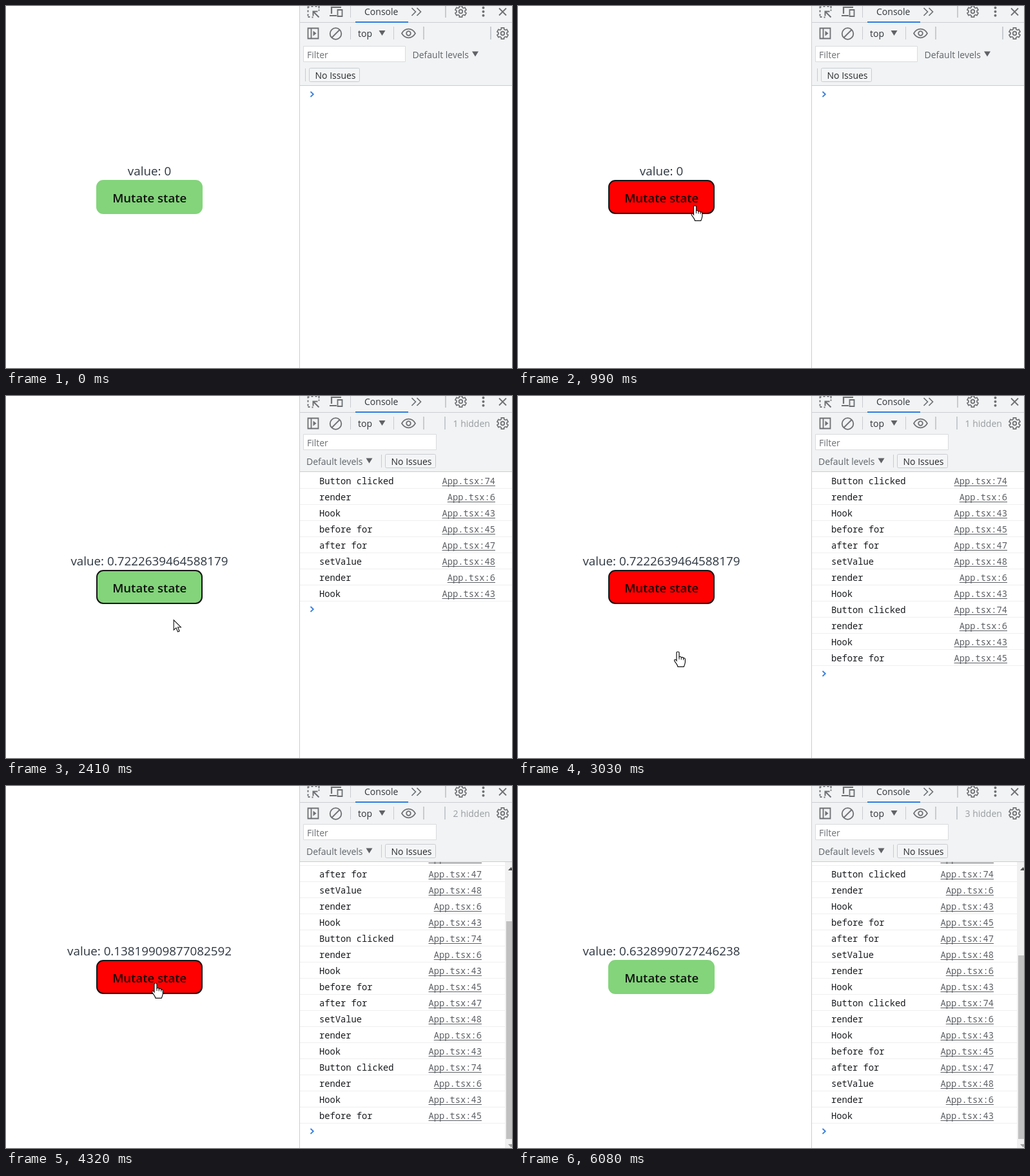
An HTML page with a canvas that plays this animation: 785 px wide and 562 px high, repeating every 6220 ms.

```html
<!DOCTYPE html>
<html lang="en">
<head>
<meta charset="utf-8">
<title>Mutate state</title>
<style>
html, body { margin: 0; width: 100%; height: 100%; overflow: hidden; background: #fff; }
canvas { display: block; width: 785px; height: 562px; }
</style>
</head>
<body>
<canvas id="stage" width="785" height="562"></canvas>
<script>
const ctx = document.getElementById('stage').getContext('2d');
const LOOP = 6220;
const SANS = '"Open Sans", "Noto Sans", sans-serif';
const UI = '14px ' + SANS;
const MONO = '13.75px "Noto Sans Mono", "DejaVu Sans Mono", monospace';
const ICON = '#6e7073';

const LOGS = [
  ['Button clicked', 74], ['render', 6], ['Hook', 43], ['before for', 45],
  ['after for', 47], ['setValue', 48], ['render', 6], ['Hook', 43]
];

// [start time, value] pairs; the last one reached is in force
const VALUES = [[0, '0'], [1880, '0.7222639464588179'], [3470, '0.13819909877082592'], [5000, '0.6328990727246238']];
const ROWS = [[0, 0], [1160, 4], [1910, 8], [2750, 12], [3500, 16], [4320, 20], [5030, 24]];
const HIDDEN = [[0, 0], [1910, 1], [3500, 2], [5030, 3]];
const BUSY = [[990, 1880], [2580, 3470], [4150, 5000]];
const FROZEN_HAND = [[990, 2300], [2580, 3790], [4150, 5390]];

const linear = p => p;
const easeOut = p => 1 - (1 - p) * (1 - p);
const smooth = p => p * p * (3 - 2 * p);

// pointer moves: start, end, from, control point, to, easing
const MOVES = [
  [100, 710, [648, 556], [340, 425], [281.5, 319], easeOut],
  [730, 960, [281.5, 319], [278, 314], [274.5, 310], linear],
  [1160, 1390, [274.5, 310], [262, 355], [282.5, 405], smooth],
  [2300, 2580, [282.5, 405], [273, 365], [237, 308], easeOut],
  [2820, 3030, [237, 308], [242.5, 352], [248, 397], linear],
  [3790, 4150, [248, 397], [242, 350], [232, 306], easeOut],
  [4390, 4660, [232, 306], [229, 360], [228, 416], smooth],
  [5390, 5480, [228, 416], [320, 455], [412, 510], linear]
];

const at = (list, t) => list.filter(e => e[0] <= t).pop()[1];
const within = (spans, t) => spans.some(([a, b]) => t >= a && t < b);

function pointer(t) {
  if (t < 100 || t >= 5480) return null;
  const [a, b, p0, p1, p2, ease] = MOVES.filter(m => m[0] <= t).pop();
  const k = ease(Math.min(1, (t - a) / (b - a)));
  return p0.map((v, i) => (1 - k) * (1 - k) * v + 2 * k * (1 - k) * p1[i] + k * k * p2[i]);
}

function text(s, x, y, font, color, align = 'left') {
  ctx.font = font;
  ctx.fillStyle = color;
  ctx.textAlign = align;
  ctx.fillText(s, x, y);
}

function rect(x, y, w, h, color) {
  ctx.fillStyle = color;
  ctx.fillRect(x, y, w, h);
}

function path(d, x, y, stroke, width, fill) {
  const p = new Path2D(d);
  ctx.save();
  ctx.translate(x, y);
  if (fill) { ctx.fillStyle = fill; ctx.fill(p); }
  if (stroke) { ctx.strokeStyle = stroke; ctx.lineWidth = width; ctx.stroke(p); }
  ctx.restore();
}

function circle(x, y, r, width, color = ICON) {
  ctx.beginPath();
  ctx.arc(x, y, r, 0, 7);
  if (width) { ctx.strokeStyle = color; ctx.lineWidth = width; ctx.stroke(); }
  else { ctx.fillStyle = color; ctx.fill(); }
}

function box(x, y, w, h, r, fill, border, width) {
  const i = width / 2;
  ctx.beginPath();
  ctx.roundRect(x + i, y + i, w - width, h - width, r);
  ctx.fillStyle = fill;
  ctx.fill();
  ctx.strokeStyle = border;
  ctx.lineWidth = width;
  ctx.stroke();
}

function gear(x, y) {
  ctx.beginPath();
  for (let i = 0; i < 6; i++) {
    for (const [r, off] of [[6.6, -0.36], [8.9, -0.24], [8.9, 0.24], [6.6, 0.36]]) {
      const a = i * Math.PI / 3 + Math.PI / 2 + off;
      ctx.lineTo(x + r * Math.cos(a), y + r * Math.sin(a));
    }
  }
  ctx.closePath();
  ctx.strokeStyle = ICON;
  ctx.lineWidth = 1.7;
  ctx.stroke();
  circle(x, y, 2.8, 1.8);
}

const sep = (x, y, h, w = 1) => rect(x, y, w, h, '#c8cbcf');
const triangle = (x, y) => path('M-5 -4H5L0 4Z', x, y, null, 0, '#606266');
const HAND = 'M-2 2Q-2 0 0 0Q2 0 2 2V8Q4.5 6.6 5.3 9Q8 7.8 8.6 10Q11.4 9.4 11.4 12V16.5Q10.8 20 9.2 23.4H0Q-.6 20.5-4.6 15.4Q-6.4 12.6-4.4 12Q-3.4 11.8-2 13.8Z';
const ARROW = 'M.5 .5V16L4.2 12.6L6.8 18.8L9.4 17.7L6.8 11.7H11.6Z';

function page(t) {
  text('value: ' + at(VALUES, t), 222.5, 263, '18.8px ' + SANS, '#2d3640', 'center');
  const busy = within(BUSY, t);
  const fill = busy ? '#ff0000' : '#83d47b';
  const focus = t >= 990 && t < 6080;
  box(140, 270, 165, 53, 10, fill, focus ? '#141414' : fill, 2);
  text('Mutate state', 222.7, 305, '600 18.6px ' + SANS, busy ? '#1c0505' : '#111', 'center');
  // smear the pointer leaves on the blocked button
  if (t >= 1180 && t < 1880) {
    ctx.save();
    ctx.beginPath();
    ctx.rect(271, 310, 14, 12);
    ctx.clip();
    path(HAND, 274.5, 310, null, 0, '#8c0000');
    ctx.restore();
    rect(272, 318, 4, 4, '#140000');
  }
}

function tabs() {
  rect(456, 25, 329, 1, '#cbcdd1');
  path('M2 1H0V3M0 6V9M0 12V15M0 16.5H3M6 17H8M5 0H8M11 0H14M16 0H17V3M17 5V7', 468.5, .5, ICON, 2);
  path('M8 8L17 17M8 15V8H15', 468.5, .5, ICON, 2);
  path('M3 12V2H18M0 15H11', 502, 0, ICON, 2.2);
  path('M13 6H20V16H13Z', 501.5, 0, ICON, 1.8);
  sep(534, 0, 18);
  text('Console', 556, 14, UI, '#33363a');
  rect(542, 24, 82, 2, '#2f7de1');
  path('M0 0L6 6L0 12M8 0L14 6L8 12', 629.5, 3, ICON, 1.7);
  sep(681, 0, 18, 2);
  gear(705.5, 8.5);
  for (const y of [3, 9, 15]) circle(740.5, y - .3, 2);
  path('M0 0L11 11M11 0L0 11', 765, 3.5, ICON, 1.8);
}

function toolbar(hidden) {
  path('M0 0H16V16H0ZM5 0V16', 468.5, 34.5, ICON, 1.8);
  path('M0 0L5 4L0 8Z', 476.5, 38.5, null, 0, ICON);
  circle(511.5, 43, 8.8, 1.8);
  path('M-6 6L6 -6', 511.5, 43, ICON, 1.8);
  sep(534, 32, 20);
  text('top', 546, 48, UI, '#303338');
  triangle(583.5, 42);
  sep(601, 32, 20);
  path('M-10.5 0Q-6.5 -6.8 0 -6.8Q6.5 -6.8 10.5 0Q6.5 6.8 0 6.8Q-6.5 6.8 -10.5 0Z', 624.5, 42.5, ICON, 1.7);
  circle(624.5, 42.5, 3.3, 1.8);
  sep(647, 32, 20, 2);
  gear(770.5, 42.5);
  sep(hidden ? 680 : 751, 32, 20, 2);
  if (hidden) text(hidden + ' hidden', 693.5, 48, UI, '#999ca0');
}

function filters(compact) {
  const y = compact ? 59 : 62;
  box(461, y, compact ? 207 : 159, 25, 0, '#fff', '#d9dbde', 1);
  text('Filter', 467, y + 19, UI, '#6c6f73');
  const [lx, ly, sx, bx, by] = compact ? [466, 107, 582, 588, 90] : [630.5, 81, 464, 470, 96];
  text('Default levels', lx, ly, UI, '#5f6368');
  triangle(lx + 97.5, ly - 6.5);
  sep(sx, by + 1, 20);
  box(bx, by, 79, 22, 2, '#f3f5f6', '#c9ccd0', 1);
  text('No Issues', bx + 9.5, by + 17, UI, '#26282b');
}

function scrollbar(count) {
  rect(774, 118, 11, 444, '#f1f1f1');
  const top = count > 20 ? 263 : 210;
  rect(776, top, 9, 548 - top, '#c1c1c1');
  path('M0 5L4.5 0L9 5Z', 779, 126, null, 0, '#505050');
  path('M0 0L4.5 5L9 0Z', 779, 556, null, 0, '#a3a3a3');
}

function log(count, top) {
  const scrolled = count > 16;
  const first = scrolled ? 517 - 25 * (count - 1) : top + 20;
  const right = scrolled ? 738 : 759;
  ctx.save();
  ctx.beginPath();
  ctx.rect(456, top + 1, 329, 562);
  ctx.clip();
  for (let i = 0; i < count; i++) {
    const y = first + 25 * i;
    if (y < top - 5) continue;
    const [msg, line] = LOGS[i % LOGS.length];
    const link = 'App.tsx:' + line;
    text(msg, 486, y, MONO, '#17191c');
    text(link, right, y, MONO, '#5c5f63', 'right');
    const w = ctx.measureText(link).width;
    rect(right - w, y + 2, w, 1, '#5c5f63');
    rect(456, y + 6, scrolled ? 318 : 329, 1, '#efefef');
  }
  path('M0 -4L4.3 0L0 4', 472.5, first + 25 * count - 6, '#3a7fdd', 1.8);
  if (scrolled) scrollbar(count);
  ctx.restore();
}

function devtools(t) {
  const hidden = at(HIDDEN, t);
  const top = hidden ? 117 : 123;
  rect(456, 0, 329, top, '#f1f3f4');
  tabs();
  toolbar(hidden);
  filters(hidden > 0);
  rect(456, top, 329, 1, '#cbcdd1');
  log(at(ROWS, t), top);
  rect(455, 0, 1, 562, '#cbcdd1');
}

function cursor(t) {
  const p = pointer(t);
  if (!p) return;
  const [x, y] = p;
  if (y < 323 || within(FROZEN_HAND, t)) {
    path(HAND, x, y, '#111', 1.2, '#fff');
    path('M2 8V12M5.3 9V12.5M8.6 10V13', x, y, '#111', 1);
  } else {
    path(ARROW, x, y, '#111', 1.1, '#fff');
  }
}

function draw(t) {
  rect(0, 0, 785, 562, '#fff');
  page(t);
  devtools(t);
  cursor(t);
}

const start = performance.now();
function loop() {
  draw((performance.now() - start) % LOOP);
  requestAnimationFrame(loop);
}
loop();
</script>
</body>
</html>
```
